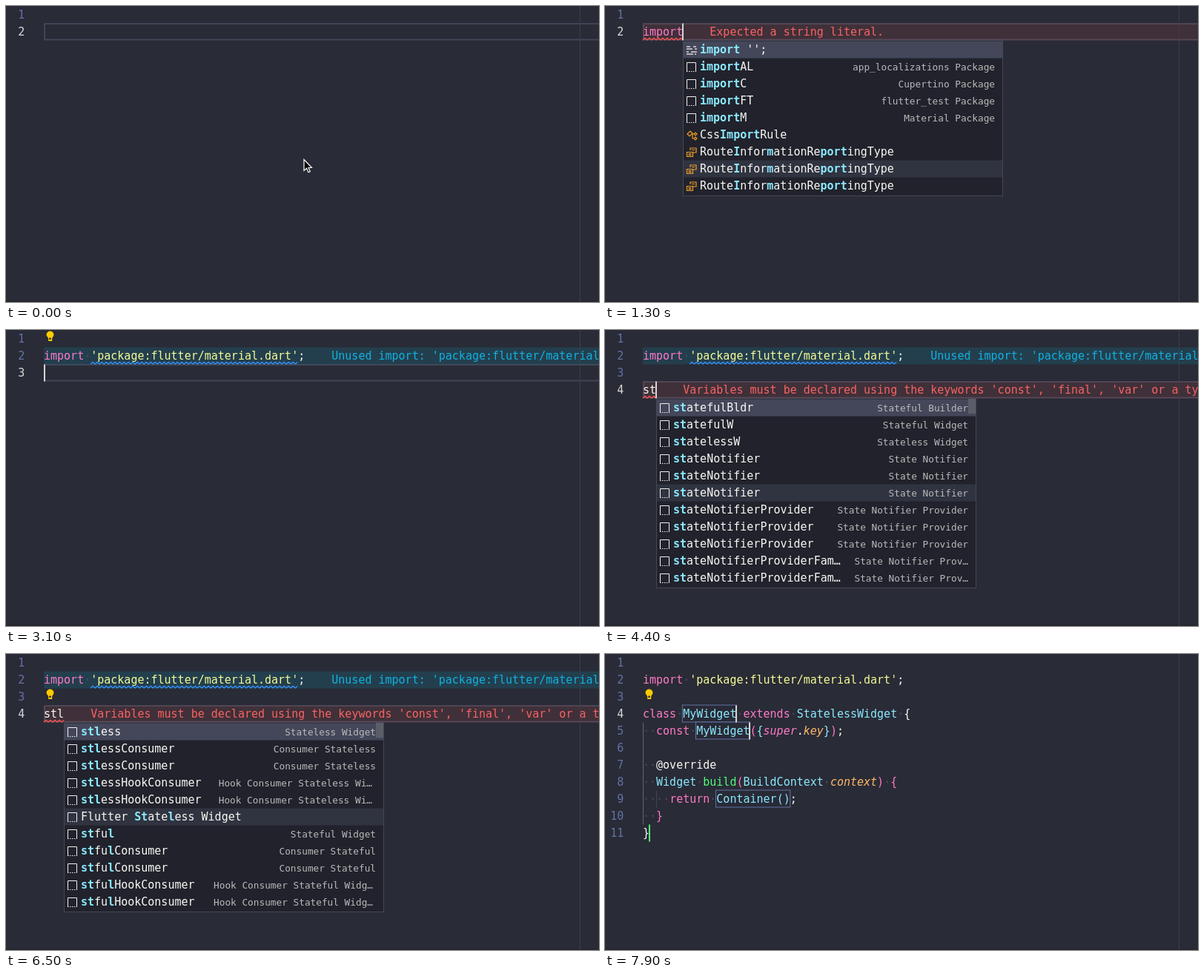
An HTML page that plays this animation: 800 by 400 pixels, repeating every 8000 ms.

```html
<!DOCTYPE html>
<html lang="en">
<head>
<meta charset="utf-8">
<title>Snippet completion</title>
<style>
html, body { margin: 0; width: 100%; height: 100%; overflow: hidden; background: #292b36; }
svg { display: block; width: 100vw; height: 100vh; }
text { font: 15px "DejaVu Sans Mono", monospace; fill: #f8f8f2; white-space: pre; }
.num { fill: #6272a4; text-anchor: end; }
.num.on { fill: #d8d8d6; }
.k { fill: #ff79c6; }
.t, .c { fill: #8be9fd; }
.f { fill: #50fa7b; }
.y { fill: #f6fa96; }
.p, .s { font-style: italic; }
.p { fill: #ffb86c; }
.s { fill: #ff79c6; }
.raw .t { font-style: italic; }
.raw .p { fill: #f8f8f2; font-style: normal; }
.raw .s { fill: #c9a9e6; }
.raw .a { fill: #ff79c6; }
.dot { fill: #4b4d5d; }
.err { fill: #f76363; }
.info { fill: #12b1e0; }
.hit { fill: #8be9fd; font-weight: bold; }
.detail { font-size: 12.75px; fill: #babab9; text-anchor: end; }
</style>
</head>
<body>
<svg id="stage" viewBox="0 0 800 400"></svg>
<script>
const LOOP = 8000, LEFT = 51, CHAR = 9.03, LINE = 23;
const svg = document.querySelector('svg');

const VARIABLES = "Variables must be declared using the keywords 'const', 'final', 'var' or a type name.";
const LITERAL = 'Expected a string literal.';
const UNUSED = "Unused import: 'package:flutter/material.dart'.";

// Each token: style letter, then its text.
const IMPORT = "kimport~w ~y'package:flutter/material.dart'~w;";
const CLASS = [
  'kclass~w ~tMyWidget~w ~kextends~w ~tStatelessWidget~w {',
  'w  ~kconst~w ~tMyWidget~k(~c{~ssuper~w.~pkey~c}~k)~w;',
  '',
  'w  ~a@override',
  'w  ~tWidget~w ~fbuild~k(~tBuildContext~w ~pcontext~k)~w ~k{',
  'w    ~kreturn~w ~tContainer~c()~w;',
  'w  ~k}',
  'w}'
];

// icon | label with matched letters in brackets | detail | detail inset
const ROUTE = 'enum|Route[I]nfor[m]ationRe[port]ingType';
const NOTIFIER = 'snip|[st]ateNotifier|State Notifier';
const PROVIDER = 'snip|[st]ateNotifierProvider|State Notifier Provider';
const FAMILY = 'snip|[st]ateNotifierProviderFam…|State Notifier Prov…';
const imports = [
  "word|[import] '';", 'snip|[import]AL|app_localizations Package',
  'snip|[import]C|Cupertino Package', 'snip|[import]FT|flutter_test Package',
  'snip|[import]M|Material Package', 'class|Css[Import]Rule', ROUTE, ROUTE, ROUTE
];
const lists = {
  wide: [...imports, ROUTE, ROUTE],
  imports,
  material: ['snip|[importM]|Material Package'],
  st: [
    'snip|[st]atefulBldr|Stateful Builder', 'snip|[st]atefulW|Stateful Widget',
    'snip|[st]atelessW|Stateless Widget', NOTIFIER, NOTIFIER, NOTIFIER,
    PROVIDER, PROVIDER, PROVIDER, FAMILY, FAMILY
  ],
  stl: [
    'snip|[stl]ess|Stateless Widget',
    ...Array(2).fill('snip|[stl]essConsumer|Consumer Stateless'),
    ...Array(2).fill('snip|[stl]essHookConsumer|Hook Consumer Stateless Wi…|5'),
    'snip|Flutter [St]ate[l]ess Widget', 'snip|[st]fu[l]|Stateful Widget',
    ...Array(2).fill('snip|[st]fu[l]Consumer|Consumer Stateful'),
    ...Array(2).fill('snip|[st]fu[l]HookConsumer|Hook Consumer Stateful Widg…|4')
  ]
};

// Changes to the editor state; "edit" restarts the caret blink.
const steps = [
  [0, { row: 2, rows: 2, typed: '', edit: -500, mouse: true }],
  [200, { typed: 'i', edit: 200, mouse: false }],
  [300, { list: 'wide' }],
  [400, { typed: 'im', edit: 400 }],
  [500, { typed: 'imp', edit: 500 }],
  [600, { typed: 'impo', edit: 600 }],
  [800, { typed: 'impor', edit: 800, list: 'imports' }],
  [900, { typed: 'import', edit: 900 }],
  [1100, { note: LITERAL }],
  [1600, { typed: 'importM', edit: 1600, list: 'material' }],
  [2100, { typed: '', imported: true, edit: 2100, list: '', note: '' }],
  [2500, { unused: true, bulb: 1 }],
  [3100, { row: 3, rows: 3, edit: 3100 }],
  [3300, { row: 4, rows: 4, edit: 3300, bulb: 0 }],
  [4000, { typed: 's', edit: 4000, list: 'st' }],
  [4200, { typed: 'st', edit: 4200 }],
  [4300, { note: VARIABLES }],
  [4900, { typed: 'stl', edit: 4900, list: 'stl' }],
  [5200, { bulb: 3 }],
  [6700, { typed: '', list: '', rows: 11, inserted: true, raw: true, edit: 6700 }],
  [7200, { note: '', unused: false }],
  [7600, { raw: false }]
];

const col = n => LEFT + n * CHAR;
const rowTop = row => (row - 1) * LINE + 0.5;
const baseline = row => rowTop(row) + 16.5;
const rect = (x, y, w, h, fill, extra = '') =>
  `<rect x="${x}" y="${y}" width="${w}" height="${h}" fill="${fill}" ${extra}/>`;
const text = (x, y, body, cls = '') => `<text x="${x}" y="${y}" class="${cls}">${body}</text>`;
const path = (d, stroke, extra = '') => `<path d="${d}" fill="none" stroke="${stroke}" ${extra}/>`;

function code(row, line) {
  if (!line) return '';
  const spans = line.split('~').map(token => {
    const body = token.slice(1).replace(/ /g, '<tspan class="dot">·</tspan>');
    return `<tspan class="${token[0]}">${body}</tspan>`;
  });
  return text(LEFT, baseline(row), spans.join(''));
}

function wave(row, from, to, color) {
  let d = `M${col(from)} ${rowTop(row) + 22.5}`;
  for (let x = col(from), i = 0; x < col(to) - 2; x += 3, i++) d += `l3 ${i % 2 ? 2.6 : -2.6}`;
  return path(d, color, 'stroke-width="1.3"');
}

function icon(kind, x, y) {
  const at = `transform="translate(${x} ${y})"`;
  if (kind === 'snip') {
    return path('M.5 12V.5H12.5V12', '#f0f0ec', at) +
      path('M0 12.5H13', '#f0f0ec', at + ' stroke-dasharray="1.5 1.5"');
  }
  if (kind === 'word') {
    return path('M0 2H5M9 2H13M0 5H8M11 5H14M0 9H3M6 9H14M0 12H9M11 12H13', '#d8d8d6', at + ' stroke-width="1.3"');
  }
  if (kind === 'class') {
    return path('M1 5L5 1L8 4L4 8ZM6 5H10M8 5V11H10M10 5l2-2 2 2-2 2ZM10 11l2-2 2 2-2 2Z', '#ee9d28', at + ' stroke-width="1.2"');
  }
  return path('M5 4V1H13V7H9M.5 6.5H8.5V12.5H.5ZM2.5 8.7H6.5M2.5 10.7H6.5M7 3.5H11', '#ee9d28', at + ' stroke-width="1.2"');
}

function mark(label, count) {
  return label.replace(/\[(.*?)\]/g, (_, part) => {
    const hit = part.slice(0, count);
    count -= hit.length;
    return `<tspan class="hit">${hit}</tspan>${part.slice(hit.length)}`;
  });
}

function popup(s) {
  const rows = lists[s.list], x = Math.round(col(s.typed.length)), y = rowTop(s.row + 1);
  const height = rows.length * LINE + 3, hover = Math.floor((216 - y - 1.5) / LINE);
  let out = rect(x + 0.5, y, 431, height, '#21222c', 'stroke="#454753"');
  rows.forEach((row, i) => {
    const [kind, label, detail = '', inset = 0] = row.split('|');
    const itemTop = y + 1 + i * LINE, textY = itemTop + 16.5;
    if (i === 0) out += rect(x + 1, itemTop, 430, LINE, '#44475a');
    else if (i === hover) out += rect(x + 1, itemTop, 430, LINE, '#303340');
    out += icon(kind, x + 5, itemTop + 5.5);
    out += text(x + 23, textY, mark(label, s.typed.length));
    out += text(x + 421 - inset, textY - 0.5, detail, 'detail');
  });
  if (s.row === 4) out += rect(x + 421, y + 0.5, 10, 20, '#5b5d68');
  return out;
}

function bulb(row) {
  const y = rowTop(row);
  return `<path transform="translate(59.5 ${y})" fill="#fc0" d="M0 1a5 5 0 0 1 5 5c0 2-2 3-2.3 5v3.5h-5V11C-2.7 9-5 8-5 6a5 5 0 0 1 5-5Z"/>` +
    rect(58.3, y + 10, 2.4, 2.5, '#292b36');
}

const holder = (row, from, to) =>
  rect(col(from) - 0.8, rowTop(row) - 0.5, (to - from) * CHAR + 1, LINE, '#282a36', 'stroke="#6272a4"');

function draw(s, caretOn) {
  let out = rect(0, 0, 800, 400, '#292b36') + rect(0, 398, 800, 2, '#242630');
  if (!s.inserted) out += rect(52, rowTop(s.row) + 0.5, 760, 21.5, 'none', 'stroke="#44475a" stroke-width="1.8"');
  if (s.unused) out += rect(LEFT, rowTop(2), 749, LINE, 'rgba(0,183,228,.14)');
  if (s.note) out += rect(LEFT, rowTop(s.row), 749, LINE * (s.inserted ? 8 : 1), 'rgba(228,84,84,.12)');
  out += rect(774, 0, 1, 400, '#3c3e4a');
  for (let n = 1; n <= s.rows; n++) out += text(25.2, baseline(n), n, n === s.row ? 'num on' : 'num');

  if (s.imported) out += code(2, IMPORT);
  if (s.unused) out += wave(2, 7, 38, '#3794ff') + text(col(43), baseline(2), UNUSED, 'info');

  if (s.inserted) {
    out += rect(51, rowTop(5), 1, LINE * 6, '#646675') + rect(69, rowTop(9), 1, LINE, '#434552');
    out += holder(4, 6, 14) + holder(5, 8, 16) + holder(9, 11, 22);
    out += `<g class="${s.raw ? 'raw' : ''}">${CLASS.map((line, i) => code(i + 4, line)).join('')}</g>`;
    out += rect(59, rowTop(11), 2, LINE, '#50fa7b');
  } else if (s.typed) {
    out += text(LEFT, baseline(s.row), s.typed, s.typed === 'import' ? 'k' : '');
  }

  if (s.note) {
    const end = s.inserted ? 1 : s.typed.length;
    out += wave(s.row, 0, s.inserted ? 3 : end, '#ff5555');
    out += text(col(end + 4), baseline(s.inserted ? 11 : s.row), s.note, 'err');
  }
  if (s.bulb) out += bulb(s.bulb);
  if (caretOn) {
    const carets = s.inserted ? [[4, 14], [5, 16]]
      : [[s.row, s.imported && s.row === 2 ? 39 : s.typed.length]];
    for (const [row, n] of carets) out += rect(Math.round(col(n)) - (n ? 1 : 0), rowTop(row), 2, LINE, '#d5d5d2');
  }
  if (s.list) out += popup(s);
  if (s.mouse) {
    out += '<path d="M402 207.5V222.5L405.5 219.3L408 224.7L410.3 223.7L408 218.5H412.5Z" fill="#000" stroke="#fff" stroke-width="1.2"/>';
  }
  svg.innerHTML = out;
}

let shown = '';
function tick() {
  const t = performance.now() % LOOP;
  const past = steps.filter(([at]) => at <= t);
  const state = Object.assign({}, ...past.map(([, change]) => change));
  const caretOn = t >= 200 && (t - state.edit) % 1000 < 500;
  const key = past.length + '/' + caretOn;
  if (key !== shown) draw(state, caretOn);
  shown = key;
  requestAnimationFrame(tick);
}
tick();
</script>
</body>
</html>
```
